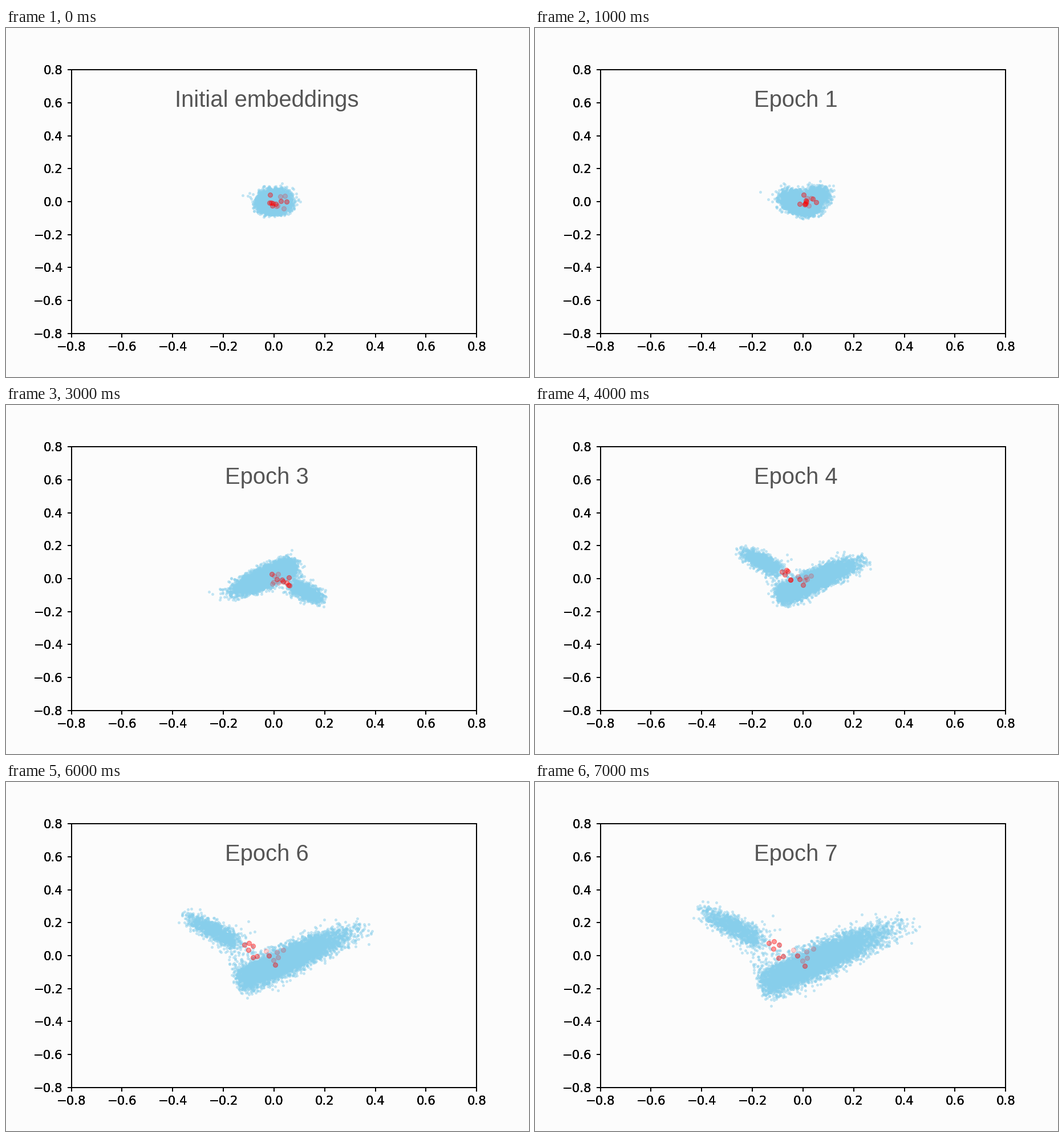
These frames come from a looping animation (917 px wide and 611 px high, 8 s). A matplotlib script:

```python
import numpy as np
import matplotlib.pyplot as plt
from matplotlib.animation import FuncAnimation

W, H, DPI = 917, 611, 128
PT = 72 / DPI                       # points per pixel
BG = "#fcfcfc"
LIM = 0.8
LEFT, RIGHT, TOP, BOTTOM = 114.6, 825.3, 73.3, 534.6
UNIT = np.array([RIGHT - LEFT, BOTTOM - TOP]) / (2 * LIM)   # pixels per data unit
N_BULK, N_WING, N_STRAY, N_FAINT = 7000, 1100, 90, 5

rng = np.random.default_rng(4)


def band(centre, along, across, degrees):
    a = np.radians(degrees)
    return np.array(centre) + np.column_stack([
        along * np.cos(a) - across * np.sin(a),
        along * np.sin(a) + across * np.cos(a)])


# Fully unfolded shape, in pixels from the plot origin, y up.
along = -105 + 340 * rng.beta(2.3, 4.7, N_BULK)
across = rng.normal(0, 12.5, N_BULK) - 0.0015 * np.clip(along - 100, 0, None) ** 2
bulk = band((15, -13), along, across, 24)
wing = band((-115, 47), 55 - 150 * rng.beta(2.4, 3.5, N_WING),
            rng.normal(0, 8.5, N_WING), -27)
strays = rng.normal((-68, 2), (18, 22), (N_STRAY, 2))
shape = np.vstack([bulk, wing, strays])

# Starting blob, flattened at its lower edge.
blob = rng.normal(0, 1, shape.shape) * (12.5, 9)
blob[:, 1] = np.where(blob[:, 1] < -22, -22 + 0.45 * (blob[:, 1] + 22), blob[:, 1])

# Marked points: clear ones at key places, half hidden ones inside the bulk.
clear_shape = np.array([(-60, 22), (-51, 25), (-42, 19), (-52, 12), (-43, -4),
                        (-35, -1), (-10, 0), (3, -18)])
faint_shape = rng.normal((-3, 0), (13, 9), (N_FAINT, 2))
clear_blob = rng.normal(0, 1, clear_shape.shape) * (17, 12)
faint_blob = rng.normal(0, 1, faint_shape.shape) * (17, 12)


def unfold(start, end, epoch, decay=1):
    """Grow the final shape out of the blob, with the epoch's axis signs."""
    s = 1 - 0.135 * (7 - epoch)
    sign = (1 if epoch >= 4 else -1, -1 if epoch == 3 else 1)
    return (s * end * sign + (1 - s) ** decay * start) / UNIT


def frame_axes():
    ax = fig.add_axes([LEFT / W, 1 - BOTTOM / H, (RIGHT - LEFT) / W, (BOTTOM - TOP) / H],
                      facecolor="none")
    ticks = np.arange(-4, 5) * 0.2
    ax.set(xlim=(-LIM, LIM), ylim=(-LIM, LIM), xticks=ticks, yticks=ticks)
    ax.tick_params(length=7.4 * PT, width=1.7 * PT, pad=7.4 * PT)
    for spine in ax.spines.values():
        spine.set_linewidth(1.7 * PT)
    return ax


plt.rcParams.update({"font.family": "DejaVu Sans", "font.size": 21.22 * PT})
fig = plt.figure(figsize=(W / DPI, H / DPI), dpi=DPI, facecolor=BG)
# Stacked axes give the labels their heavy, built-up edges.
for _ in range(3):
    ax = frame_axes()

dots = ax.scatter([], [], s=(5 * PT) ** 2, color="skyblue", alpha=0.5, linewidths=0)
red = dict(s=(8 * PT) ** 2, color="red", linewidths=1.2 * PT, zorder=3)
clear = ax.scatter([], [], alpha=0.4, **red)
faint = ax.scatter([], [], alpha=0.18, **red)
title = fig.text(457.2 / W, 1 - 138 / H, "", ha="center", va="baseline",
                 family="Liberation Sans", size=40 * PT, color="#555555")


def draw(epoch):
    dots.set_offsets(unfold(blob, shape, epoch))
    clear.set_offsets(unfold(clear_blob, clear_shape, epoch, decay=2))
    faint.set_offsets(unfold(faint_blob, faint_shape, epoch, decay=2))
    title.set_text(f"Epoch {epoch}" if epoch else "Initial embeddings")
    return dots, clear, faint, title


anim = FuncAnimation(fig, draw, frames=8, init_func=lambda: draw(0),
                     interval=1000, repeat=True, repeat_delay=0)
plt.show()
```
